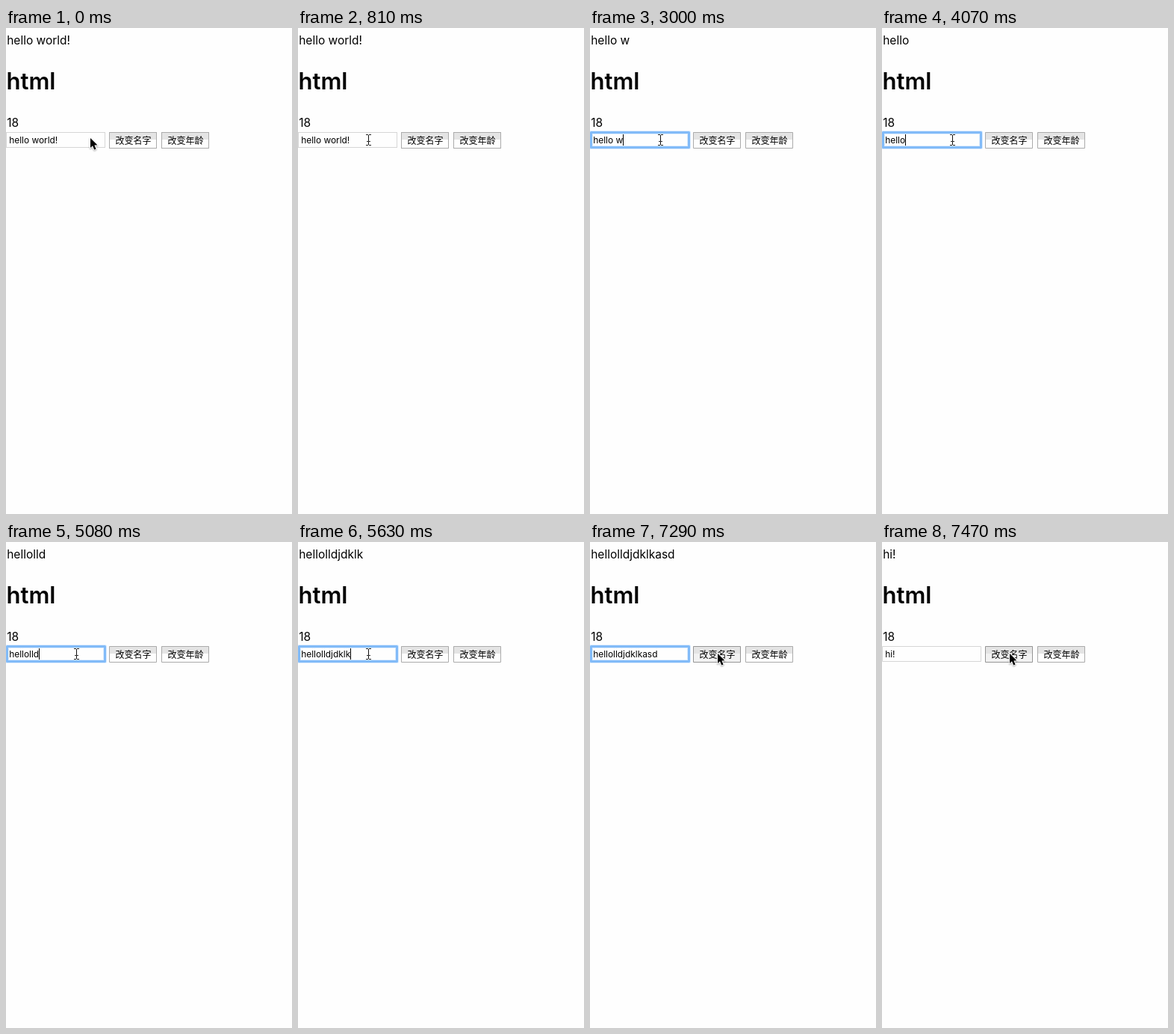
These frames come from a looping animation (383 px wide and 649 px high, 8000 ms). An HTML page with a canvas:

```html
<!DOCTYPE html>
<html lang="zh">
<head>
<meta charset="utf-8">
<style>
  html, body { margin: 0; width: 100%; height: 100%; overflow: hidden; background: #fefefe; }
  canvas { display: block; }
</style>
</head>
<body>
<canvas id="stage"></canvas>
<script>
const W = 383, H = 649, LOOP = 8000;
const LATIN = 'Inter, "Noto Sans", sans-serif';
const CJK = '"Noto Sans CJK SC", "Noto Sans CJK", sans-serif';

const canvas = document.getElementById('stage');
const ctx = canvas.getContext('2d');
const ratio = window.devicePixelRatio || 1;
canvas.width = W * ratio;
canvas.height = H * ratio;
canvas.style.width = W + 'px';
canvas.style.height = H + 'px';

const START = 'hello world!';
const TYPED = 'hellolldjdklkasd';
const DELETE_TIMES = [2470, 2590, 2710, 2880, 2990, 3110, 3650];
const TYPE_TIMES = [4490, 4720, 5080, 5230, 5290, 5340, 5570, 5630, 5690, 5750, 5810];
const CARET_ON = [[1160, 1580], [2060, 3590], [4070, 6290], [6810, 7290]];
const FOCUS = 1160, PRESS = 7290, BLUR = 7410, RENAME = 7470;

// Cursor path after typing: time, x, y
const PATH = [
  [6290, 95, 151], [6404, 108, 164], [6518, 125, 172],
  [6600, 138, 177], [6730, 157, 167], [6917, 171, 149]
];
const MOVE_START = PATH[0][0], MOVE_END = PATH[PATH.length - 1][0], MOVE_STEP = 57;

const countPassed = (times, t) => times.filter(x => t >= x).length;

function valueAt(t) {
  if (t >= RENAME) return 'hi!';
  const typed = countPassed(TYPE_TIMES, t);
  if (typed) return TYPED.slice(0, 5 + typed);
  return START.slice(0, START.length - countPassed(DELETE_TIMES, t));
}

function cursorAt(t) {
  if (t < 390) return { arrow: true, x: t < 60 ? 113 : 112, y: t < 60 ? 147 : 148 };
  if (t < MOVE_START) {
    const step = Math.min(6, Math.floor((t - 390) / 70));
    const left = 1 - (step + 1) / 7;
    return { arrow: false, x: Math.round(94 + 16 * left * left), y: 149 };
  }
  const steps = Math.floor((t - MOVE_START) / MOVE_STEP);
  const tick = Math.min(MOVE_START + steps * MOVE_STEP, MOVE_END);
  let i = 0;
  while (i < PATH.length - 2 && tick >= PATH[i + 1][0]) i++;
  const [t0, x0, y0] = PATH[i], [t1, x1, y1] = PATH[i + 1];
  const k = (tick - t0) / (t1 - t0);
  return {
    arrow: tick >= 6400,
    x: Math.round(x0 + (x1 - x0) * k),
    y: Math.round(y0 + (y1 - y0) * k)
  };
}

function rect(x, y, w, h, color) {
  ctx.fillStyle = color;
  ctx.fillRect(x, y, w, h);
}

function frame(x, y, w, h, color, width = 1) {
  ctx.strokeStyle = color;
  ctx.lineWidth = width;
  ctx.strokeRect(x + 0.5, y + 0.5, w - 1, h - 1);
}

function text(str, x, y, font) {
  ctx.font = font;
  ctx.fillStyle = '#000';
  ctx.fillText(str, x, y);
}

function drawInput(value, focused, caret) {
  if (focused) {
    ctx.lineJoin = 'round';
    frame(1, 139, 132, 21, '#dcecfd', 5);
    frame(1, 139, 132, 21, '#82bbf8', 3);
  } else {
    frame(0, 139, 133, 21, '#d6d6d6');
  }
  text(value, 4.2, 154, '11.9px ' + LATIN);
  if (caret) rect(Math.floor(4.2 + ctx.measureText(value).width), 142, 1, 15, '#000');
}

function drawButton(label, x, pressed) {
  rect(x, 139, 64, 22, pressed ? '#f2f2f2' : '#fefefe');
  rect(x, 139, 64, 10, '#e4e4e4');
  frame(x, 139, 64, 22, pressed ? '#959595' : '#ababab');
  text(label, x + 8.5, 154.5, '12px ' + CJK);
}

function drawArrow(x, y) {
  const points = [[0, 0], [0, 13], [3, 10.3], [5.2, 15.4], [7.6, 14.4], [5.4, 9.4], [9.4, 9.2]];
  ctx.save();
  ctx.translate(x, y);
  ctx.beginPath();
  points.forEach(p => ctx.lineTo(...p));
  ctx.closePath();
  ctx.shadowColor = 'rgba(0,0,0,.35)';
  ctx.shadowBlur = 2 * ratio;
  ctx.shadowOffsetY = ratio;
  ctx.strokeStyle = '#fff';
  ctx.lineWidth = 2;
  ctx.lineJoin = 'round';
  ctx.stroke();
  ctx.shadowColor = 'transparent';
  ctx.fillStyle = '#000';
  ctx.fill();
  ctx.restore();
}

function drawBeam(x, y) {
  rect(x, y - 6, 1, 13, '#111');
  rect(x - 2, y + 2, 5, 1, '#333');
  [-7, 7].forEach(dy => {
    rect(x - 3, y + dy, 3, 1, '#222');
    rect(x + 1, y + dy, 3, 1, '#222');
  });
}

function draw(t) {
  const value = valueAt(t);
  const caret = CARET_ON.some(([from, to]) => t >= from && t < to);
  ctx.setTransform(ratio, 0, 0, ratio, 0, 0);
  rect(0, 0, W, H, '#fefefe');
  text(value, 1.2, 22, '15.5px ' + LATIN);
  text('html', 0.5, 82, '600 31px ' + LATIN);
  text('18', 1.2, 132, '15.5px ' + LATIN);
  drawInput(value, t >= FOCUS && t < BLUR, caret);
  drawButton('改变名字', 138, t >= PRESS);
  drawButton('改变年龄', 208, false);
  const cursor = cursorAt(t);
  (cursor.arrow ? drawArrow : drawBeam)(cursor.x, cursor.y);
}

const began = performance.now();
function tick() {
  draw((performance.now() - began) % LOOP);
  requestAnimationFrame(tick);
}
tick();
</script>
</body>
</html>
```
